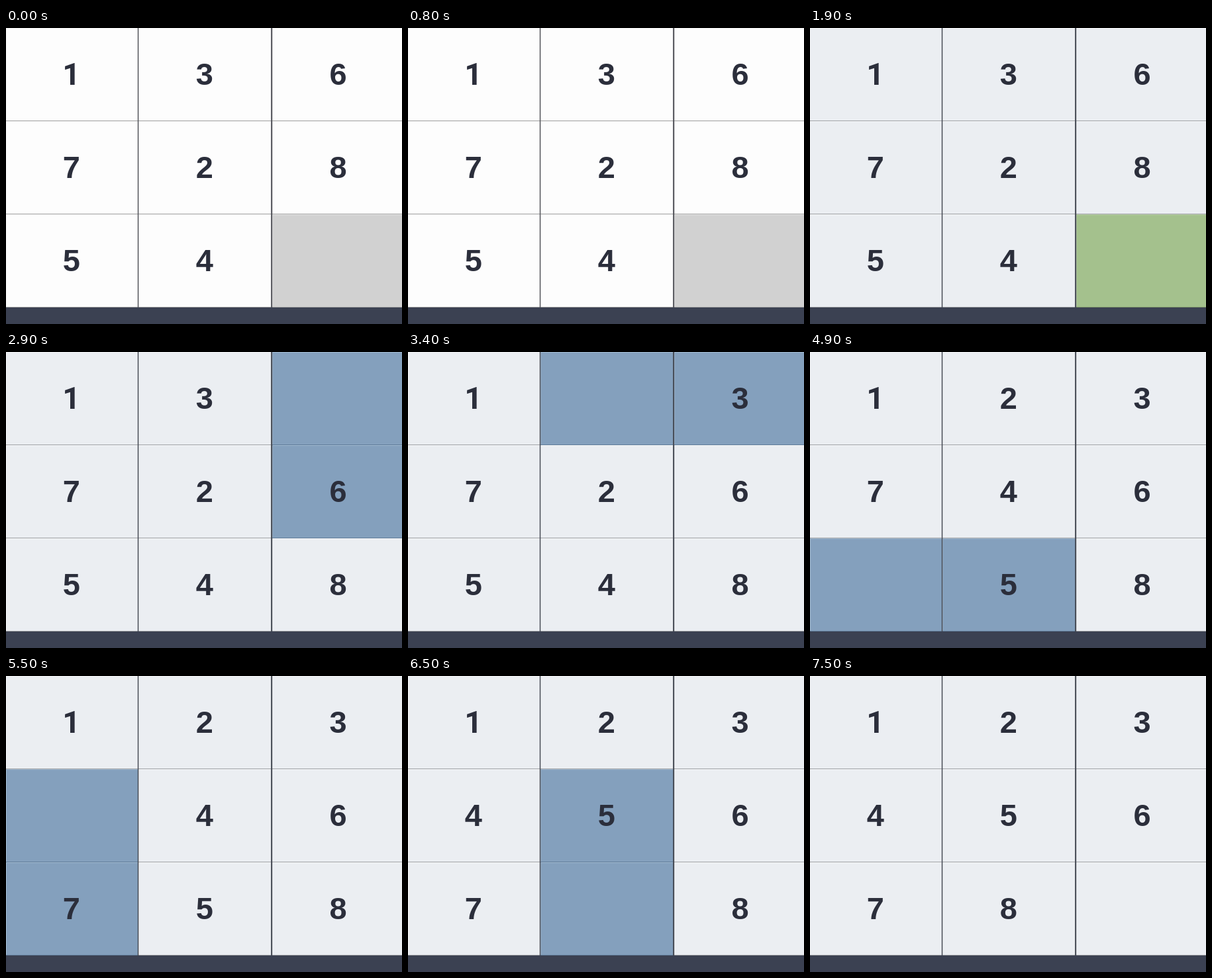
Recreate the animation shown at these times as an HTML page with a canvas. Size 598 by 448 pixels, loop 8 s.

```html
<!DOCTYPE html>
<html lang="en">
<head>
<meta charset="utf-8">
<title>Sliding puzzle</title>
<style>
  html, body { margin: 0; width: 100%; height: 100%; overflow: hidden; background: #3b4152; }
  canvas { display: block; }
</style>
</head>
<body>
<canvas id="stage" width="598" height="448"></canvas>
<script>
const ctx = document.getElementById('stage').getContext('2d');
const LOOP = 8000, START = 1900, END = 7500;
const BOARD = [1, 3, 6, 7, 2, 8, 5, 4, 0];
// The gap walks along these cells, one step per time.
const PATH = [8, 5, 2, 1, 4, 7, 6, 3, 4, 7, 8];
const TIMES = [2400, 2900, 3400, 3900, 4400, 4900, 5400, 6000, 6500, 7000];
const LEFT = [0, 200, 402], RIGHT = [200, 401, 598], CENTER = [98.7, 299.8, 501.5];
const ROW = 141;

// Each style: face, top/left highlight, bottom shade.
const STYLES = {
  white: ['#fdfdfd', '#f6f6f6', '#a3a3a3'],
  grey:  ['#d1d1d1', '#e6e6e6', '#a3a3a3'],
  light: ['#ebeef2', '#f4f6f8', '#9fa1a5'],
  green: ['#a4c18d', '#bdd3ab', '#7d9569'],
  blue:  ['#84a0bd', '#a3bbd2', '#5f7b98']
};

function rect(color, x, y, w, h) {
  ctx.fillStyle = color;
  ctx.fillRect(x, y, w, h);
}

function drawCell(i, style, digit) {
  const col = i % 3, row = Math.floor(i / 3);
  const x = LEFT[col], y = row * ROW, w = RIGHT[col] - x;
  const [face, shine, shade] = STYLES[style];
  rect(face, x, y, w, ROW);
  rect(shine, x, y, w, 1);
  rect(shine, x, y, 1, ROW);
  rect(shade, x, y + ROW - 1, w, 1);
  if (digit) {
    // Roboto's 1 has no foot.
    const family = digit === 1 ? 'Roboto' : '"Liberation Sans", Arial';
    ctx.font = `bold 47px ${family}, sans-serif`;
    ctx.fillStyle = '#2b2e3b';
    ctx.fillText(digit, CENTER[col], y + 86);
  }
}

function styleOf(i, t, step) {
  if (t < START) return i === 8 ? 'grey' : 'white';
  if (t >= END) return 'light';
  if (!step) return i === 8 ? 'green' : 'light';
  return i === PATH[step] || i === PATH[step - 1] ? 'blue' : 'light';
}

function draw(t) {
  const step = TIMES.filter(time => time <= t).length;
  const board = BOARD.slice();
  for (let k = 0; k < step; k++) {
    board[PATH[k]] = board[PATH[k + 1]];
    board[PATH[k + 1]] = 0;
  }
  ctx.textAlign = 'center';
  rect('#3b4152', 0, 0, 598, 448);
  board.forEach((digit, i) => drawCell(i, styleOf(i, t, step), digit));
  const line = t < START ? '#55565c' : '#454a54';
  rect(line, 198.8, 0, 1.5, 423);
  rect(line, 400.1, 0, 2.1, 423);
}

function frame(now) {
  draw(now % LOOP);
  requestAnimationFrame(frame);
}
draw(0);
requestAnimationFrame(frame);
</script>
</body>
</html>
```
